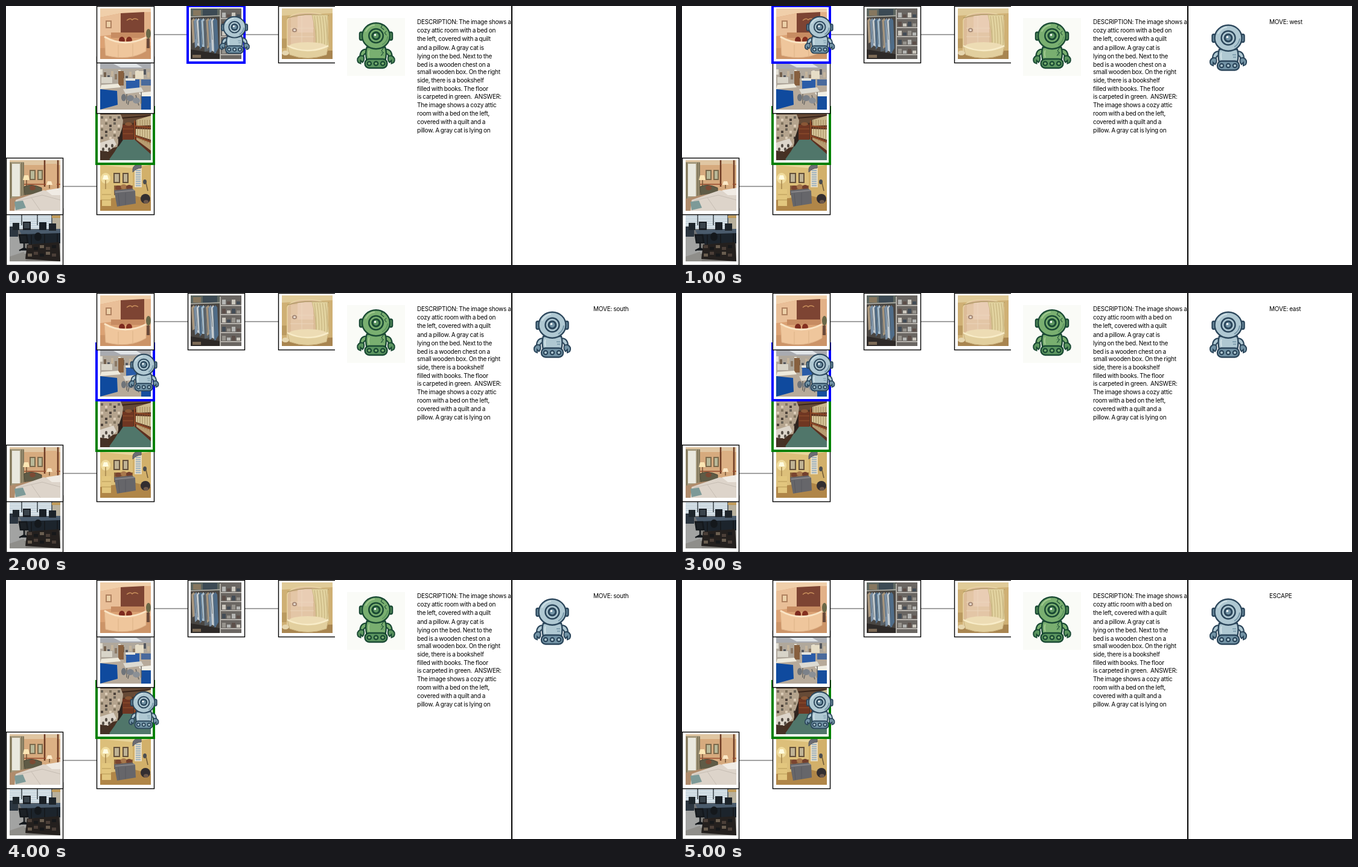
An HTML page that plays this animation: 1110x430 px, repeating every 6000 ms.

```html
<!DOCTYPE html>
<html lang="en">
<head>
<meta charset="utf-8">
<title>Robot room search</title>
<style>
html, body { margin: 0; width: 100%; height: 100%; overflow: hidden; background: #fff; }
svg { display: block; }
text { font: 10px Inter, Arial, sans-serif; letter-spacing: -.2px; word-spacing: -.6px; fill: #000; white-space: pre; }
</style>
</head>
<body>
<svg id="stage" width="1110" height="430" viewBox="0 0 1110 430"></svg>
<script>
const rect = (x, y, w, h, fill, more = "") =>
  `<rect x="${x}" y="${y}" width="${w}" height="${h}" fill="${fill}" ${more}/>`;
const poly = (points, fill) => `<polygon points="${points}" fill="${fill}"/>`;
const oval = (x, y, rx, ry, fill, more = "") =>
  `<ellipse cx="${x}" cy="${y}" rx="${rx}" ry="${ry}" fill="${fill}" ${more}/>`;
const path = (d, stroke, width = 1, fill = "none") =>
  `<path d="${d}" stroke="${stroke}" stroke-width="${width}" fill="${fill}"/>`;
const repeat = (n, draw) => Array.from({ length: n }, (_, i) => draw(i)).join("");
const pick = (list, i) => list[i % list.length];

// Each photo is a simplified 84 x 84 scene.
const photos = {
  lobby: () =>
    rect(0, 0, 84, 84, "#dba274") +
    poly("0,0 84,0 84,7 34,8 0,15", "#f0cfaa") +
    poly("0,15 34,8 34,42 0,46", "#e9bf98") +
    rect(9, 20, 10, 13, "#b08260") + rect(11, 22, 6, 9, "#ecd0a8") +
    poly("34,8 73,6 73,42 34,41", "#7d4433") +
    path("M44 20q6 -5 9 -1q4 -4 10 0", "#c9905c", 1.5) +
    rect(73, 6, 11, 50, "#e2b188") +
    poly("0,66 84,62 84,84 0,84", "#cc9468") +
    rect(18, 40, 56, 9, "#c78c62") +
    oval(36, 53, 5, 6, "#7c2a1e") + oval(48, 53, 5, 6, "#84301f") +
    path("M7 46Q40 66 76 47V71Q48 88 9 78Z", "#dcb086", 1, "#efc69c") +
    path("M7 47Q40 66 76 48", "#fae4c4", 3) +
    path("M30 60V82M54 59V81", "#dcb286") +
    oval(80, 42, 4, 8, "#6a6848") + rect(77, 50, 5, 16, "#6a4a3a"),

  workshop: () =>
    rect(0, 0, 84, 84, "#b0a89c") +
    rect(0, 0, 84, 16, "#a9abb0") + poly("22,8 60,8 70,14 34,14", "#dfe3e6") +
    repeat(14, i => rect(i * 6, 17 + (i * 5) % 12, 4, 9,
      pick(["#e2ded2", "#75624f", "#565a60", "#c4b49c", "#8c7a66"], i))) +
    rect(30, 20, 9, 24, "#87603f") + rect(58, 20, 14, 13, "#e6ddc6") +
    rect(2, 30, 18, 10, "#d8d4c8") +
    poly("0,46 84,42 84,84 0,84", "#b7aa9a") +
    rect(43, 34, 22, 18, "#2a5ca8") + rect(42, 32, 16, 4, "#e4e4de") + rect(68, 34, 16, 10, "#4a6a9c") +
    poly("2,43 30,41 34,47 0,50", "#eeeadc") +
    poly("0,50 28,53 29,76 0,84", "#0f4a9e") +
    poly("38,50 68,47 72,54 42,58", "#dcdad2") +
    rect(68, 61, 16, 23, "#164e9e") + poly("64,56 84,54 84,62 68,62", "#f0eee4") +
    path("M44 58V74M68 55V74M50 60l-4 16M59 60l5 17", "#6a6864", 1.5) +
    oval(50, 65, 6, 5, "#7c828a") + oval(60, 69, 6, 5, "#8b9096") +
    oval(39, 64, 4, 6, "#6f747a"),

  attic: () =>
    rect(0, 0, 84, 84, "#473022") +
    poly("28,6 84,6 84,20 56,22 34,24", "#664a36") +
    path("M36 14L84 10", "#38241a", 2) +
    poly("0,8 34,8 38,18 36,36 28,62 0,68", "#b5a48e") +
    repeat(20, i => rect(1 + (i % 5) * 7, 11 + Math.floor(i / 5) * 10 + (i % 2) * 4, 4, 4,
      pick(["#6c6458", "#dccdb8", "#81745f", "#4f443c"], i))) +
    poly("24,70 36,50 58,49 84,72 84,84 14,84", "#50766a") +
    poly("30,50 38,26 38,50 30,62", "#2f241e") +
    rect(37, 25, 18, 25, "#6f3622") +
    path("M38 32H55M38 40H55", "#96542f") + oval(47, 24, 6, 3, "#8a5736") +
    poly("55,22 84,14 84,74 56,49", "#5d3020") +
    poly("60,17 84,10 84,26 60,27", "#cbb88c") +
    poly("59,32 84,33 84,50 59,42", "#d8c79a") +
    poly("60,46 84,55 84,68 60,50", "#b89c70") +
    repeat(6, i => path(`M${62 + i * 4} 17V${48 + i * 2}`, "#8d7148", .8)) +
    path("M56 27L84 30M56 43L84 54M57 18V50", "#8f4826", 2) +
    poly("0,55 22,48 27,58 13,70 0,68", "#ddd5ca") +
    repeat(4, i => oval(5 + i * 5, 66 - i % 2 * 6, 2, 3, "#544c44")) +
    poly("0,70 11,69 16,84 0,84", "#453226"),

  study: () =>
    rect(0, 0, 84, 84, "#dcbf7a") +
    poly("0,0 84,0 84,8 52,13 0,8", "#e8d59c") +
    poly("54,12 84,8 84,70 54,60", "#d2b06a") +
    rect(22, 21, 11, 17, "#64503a") + rect(24, 23, 7, 13, "#bfb294") +
    rect(37, 21, 10, 17, "#64503a") + rect(39, 23, 6, 13, "#bfb294") +
    poly("0,66 54,58 84,66 84,84 0,84", "#b08648") +
    rect(57, 13, 12, 32, "#e8dcc0") +
    repeat(8, i => rect(59, 16 + i * 3.6, 8, 2, "#9db2c0")) +
    path("M54 15q1 -9 14 -8v6q-8 0 -14 7Z", "#585860", 1, "#6c6c72") +
    oval(74, 36, 3, 4, "#4b4d50") + path("M76 38l3 13", "#705a38", 1.5) +
    oval(9, 30, 8, 9, "#f0dc9e") +
    poly("4,32 6,25 12,25 14,32", "#fffbe0") + path("M9 33V49", "#a4844c", 1.5) +
    rect(3, 48, 15, 28, "#e2c67e") + path("M3 57H18M3 66H18", "#b59655") +
    rect(23, 42, 31, 16, "#8b633a") +
    oval(30, 46, 5, 4, "#7a4530") + oval(39, 44, 5, 4, "#a8784c") + oval(48, 45, 5, 4, "#73402e") +
    poly("23,50 53,47 58,51 59,72 28,77", "#66666a") + path("M25 53L57 50", "#88878a", 2) +
    path("M30 55L32 76M42 54V74", "#59595e") +
    oval(75, 64, 8, 8, "#332e30") + oval(76, 69, 4, 3, "#6c584c"),

  hotel: () =>
    rect(0, 0, 84, 84, "#d6aa7e") +
    rect(0, 0, 84, 8, "#e0c6a2") +
    rect(0, 3, 24, 62, "#a59a7e") + rect(4, 6, 13, 54, "#e9e8de") +
    path("M2 4V65M20 4V62M23 4V60", "#80765a", 2) +
    rect(33, 16, 10, 17, "#7c6a4c") + rect(35, 18, 6, 13, "#b8b898") +
    rect(46, 16, 9, 17, "#7c6a4c") + rect(48, 18, 5, 13, "#b8b898") +
    path("M58 0V44M80 0V50", "#6f3c24", 2.5) + path("M24 40H84", "#964a2c", 1.5) +
    rect(60, 6, 18, 36, "#dcb084") +
    poly("22,33 24,25 31,25 33,33", "#fbe6b4") + path("M28 33V45", "#755536", 1.5) +
    poly("61,41 63,35 69,35 71,41", "#fbe8c6") + path("M66 41V47", "#755536", 1.5) +
    path("M24 44q12 -6 29 2v13H25Z", "#454434", 1, "#5f5b46") + oval(38, 46, 5, 4, "#7c4a34") +
    poly("0,64 25,58 54,54 84,58 84,84 0,84", "#b08c6c") +
    poly("10,66 56,50 84,54 84,84 8,84", "#ddd4ca") +
    poly("60,50 84,46 84,58 70,58", "#f0ebe4") +
    path("M14 67L54 58L84 66M36 62L51 84", "#c6bdb3") +
    poly("8,69 22,67 27,79 10,83", "#7d9a98"),

  office: () =>
    rect(0, 0, 84, 84, "#6f7274") +
    rect(0, 0, 72, 30, "#b4c6d2") +
    repeat(8, i => rect(0, 7 + i * 3, 70, 1.4, "#eef3f5")) +
    path("M20 0V24M46 0V24M70 0V28", "#5c666c", 2) +
    rect(71, 6, 13, 24, "#b8b09c") + rect(70, 8, 14, 4, "#c09a58") +
    rect(0, 40, 84, 44, "#82807c") +
    poly("0,42 16,42 30,70 0,78", "#a2a3a2") +
    poly("16,32 84,30 84,38 20,40", "#4a5b6c") +
    poly("22,39 84,37 84,54 32,56", "#1c242c") +
    rect(0, 26, 14, 17, "#2c3640") +
    rect(22, 18, 13, 14, "#191e24") + rect(49, 19, 12, 13, "#1a2026") + rect(65, 21, 12, 12, "#1d242a") +
    rect(24, 20, 9, 9, "#3a444c") + rect(5, 20, 11, 12, "#1e262c") +
    path("M36 40V56M58 39V55M79 38V56", "#161a1e", 2) +
    path("M16 40h12l2 13H18ZM24 54v10M16 66l8 -4l8 4", "#14181c", 2.5, "#1c2126") +
    oval(47, 43, 6, 7, "#14181c") +
    poly("29,56 82,52 84,84 26,80", "#24201e") +
    repeat(10, i => rect(30 + i % 5 * 10, 57 + Math.floor(i / 5) * 11 + i % 2 * 3, 7, 5,
      pick(["#4b3f38", "#16181a", "#6a5e50"], i))) +
    poly("0,76 24,68 27,84 0,84", "#8f8e8a"),

  closet: () =>
    rect(0, 0, 84, 84, "#4a4642") +
    rect(0, 0, 48, 14, "#5d6660") + rect(4, 3, 13, 9, "#86775f") + rect(20, 1, 24, 11, "#3c4a54") +
    path("M0 14L48 12", "#b5b1a8", 1.5) +
    repeat(10, i => poly(`${1 + i * 4},${20 + i % 3} ${5 + i * 4},16 ${8 + i * 4},20 ${10 + i * 4},${54 + i * 5 % 14 + i} ${3 + i * 4},${58 + i * 7 % 13 + i}`,
      pick(["#a8957c", "#7a90a6", "#c6cccf", "#4f6c88", "#a5bccc", "#59626a"], i))) +
    repeat(9, i => path(`M${5 + i * 4} 21l3 ${30 + i * 7 % 12}`, "#5b666e", .8)) +
    rect(49, 0, 35, 84, "#6a6662") +
    repeat(5, y => rect(50, 16 + y * 15, 34, 1.5, "#cbc8c2") +
      repeat(4, x => rect(52 + x * 8, 7 + y * 15 + x % 2 * 3, 6, 8 - x % 2 * 3,
        pick(["#b4b5b3", "#5d4f4a", "#cbc7be", "#434c56", "#96938d"], x + y)))) +
    path("M49 2V84", "#cdcac2", 1.5) +
    poly("0,68 48,76 48,84 0,84", "#2e2a28") + rect(3, 77, 14, 5, "#7c6a56"),

  bath: () =>
    rect(0, 0, 84, 84, "#cfb074") +
    poly("0,0 84,0 84,8 0,12", "#e0cb98") +
    path("M9 70V20Q14 7 42 7Q72 7 76 20V66Z", "#e8d4a4", 1.5, "#dcbc98") +
    poly("15,16 52,12 52,62 15,62", "#e3c6a6") +
    poly("26,12 52,10 52,40 26,40", "#e9cdb4") +
    path("M14 33H53M14 47H53M33 12V62", "#edd8bf", .8) +
    path("M9 16Q35 7 78 12", "#a8925f", 1.2) +
    path("M50 11h26q-2 26 2 54H56q2 -25 -6 -54", "#cdb984", 1, "#e2d3a0") +
    repeat(5, i => path(`M${54 + i * 4.5} 13q4 28 3 52`, "#c4b07c", 1)) +
    oval(21, 36, 4, 3.5, "#a68977") + oval(21, 36, 2, 1.5, "#f0e6da") +
    poly("0,72 84,70 84,84 0,84", "#a88550") +
    path("M9 62Q42 76 77 62L74 77Q42 88 13 77Z", "#cab17e", 1, "#e2cf9e") +
    oval(43, 63, 31, 7, "#eddcb4") + path("M9 62Q42 78 77 62", "#f8ecc8", 2.5) +
    rect(0, 50, 8, 16, "#bb9a60") + oval(6, 74, 6, 4, "#e6d6ae")
};

// Column and row of each room; later rooms lie on top.
const rooms = {
  office: [0, 4], hotel: [0, 3], study: [1, 3], attic: [1, 2],
  workshop: [1, 1], lobby: [1, 0], closet: [2, 0], bath: [3, 0]
};
const size = 94.6;
const corner = name => [.3 + 150.4 * rooms[name][0], 84 * rooms[name][1]];

function room(name) {
  const [x, y] = corner(name);
  return rect(0, 0, 0, 0, "#fff", `id="${name}"`) +
    `<svg x="${Math.round(x + 5.3)}" y="${y + 4}" width="84" height="84">` +
    `<g filter="url(#soft)">${photos[name]()}</g></svg>`;
}

function robot(dark, mid, light, shine) {
  const edge = `stroke="${dark}" stroke-width="2.4"`;
  const side = s => `<g transform="scale(${s} 1)">` +
    rect(21.5, -22, 5, 13, mid, edge + ' rx="2.5"') +
    path("M15 6Q25 6 26 17L21 20Q20 13 15 13Z", dark, 2.2, light) +
    path("M20 18Q27 15 30 22Q31 29 25 30L25 25L22 28Q18 24 20 18Z", dark, 2, mid) + "</g>";
  return side(-1) + side(1) +
    path("M-15 3H15Q18 13 15 25H-15Q-18 13 -15 3Z", dark, 2.4, light) +
    path("M-11 8Q-13 13 -11 20", shine, 2) +
    path("M7 12H13M8 16H13", mid, 1.4) +
    rect(-18, 22.5, 36, 15, mid, edge + ' rx="7"') +
    repeat(3, i => oval(i * 11 - 11, 30, 3.2, 3.2, light, `stroke="${dark}" stroke-width="2.2"`)) +
    oval(0, -15.8, 22.5, 21.5, light, edge) +
    path("M-17 -23Q-12 -33 -2 -34", shine, 2) +
    path("M10 -1Q18 -6 19 -15", mid, 2) +
    oval(0, -16, 11.5, 11.5, light, edge) +
    oval(0, -16, 7.5, 7.5, dark) + oval(0, -16, 4.4, 4.4, mid) +
    oval(-1.5, -17.5, 1.8, 1.8, "#fff");
}

const blueBot = robot("#2b465b", "#7394a6", "#afc8d2", "#d0e1e6");
const greenBot = robot("#1a4a34", "#5c9660", "#79af70", "#a3ca92");
const cracks = path("M7 -37l3 4l-2 3l5 4M17 -24l-3 3l3 4M12 4l-3 5l3 3l-4 5", "#1a4a34", 1);

const words = `DESCRIPTION: The image shows a
cozy attic room with a bed on
the left, covered with a quilt
and a pillow. A gray cat is
lying on the bed. Next to the
bed is a wooden chest on a
small wooden box. On the right
side, there is a bookshelf
filled with books. The floor
is carpeted in green.  ANSWER:
The image shows a cozy attic
room with a bed on the left,
covered with a quilt and a
pillow. A gray cat is lying on`.split("\n");
const baselines = [30, 44, 58, 73, 87, 101, 113, 127, 141, 154, 168, 182, 196, 210];

document.getElementById("stage").innerHTML =
  `<filter id="soft" x="0" y="0" width="1" height="1"><feGaussianBlur stdDeviation=".6"/></filter>` +
  rect(0, 0, 1110, 430, "#fff") +
  `<svg width="545" height="430">` +
  path("M245 47.5H301M395 47.5H452M94 299.5H151", "#808080", 1.4) +
  Object.keys(rooms).map(room).join("") +
  `<g id="walker">${blueBot}</g></svg>` +
  rect(565, 20, 96, 96, "#fafbf7") +
  `<g transform="translate(613 65.5) scale(1.02 1)">${greenBot}${cracks}</g>` +
  words.map((line, i) => `<text x="681" y="${baselines[i]}">${line}</text>`).join("") +
  rect(837, 0, 2, 430, "#000") +
  `<g id="panel"><g transform="translate(905 69)">${blueBot}</g>` +
  `<text id="move" x="973" y="30"></text></g>`;

const steps = [
  ["closet", ""], ["lobby", "MOVE: west"], ["workshop", "MOVE: south"],
  ["workshop", "MOVE: east"], ["attic", "MOVE: south"], ["attic", "ESCAPE"]
];
const el = id => document.getElementById(id);
const start = performance.now();
let shown = -1;

// Snaps the border to whole pixels: thin lines on centres, thick ones on edges.
function setBorder(name, color) {
  const [x, y] = corner(name);
  const thin = color === "black";
  const snap = v => Math.floor(v) + (thin ? .5 : 0);
  const attrs = {
    x: snap(x), y: snap(y),
    width: snap(x + size) - snap(x), height: snap(y + size) - snap(y),
    stroke: color, "stroke-width": thin ? 1.4 : 4
  };
  for (const key in attrs) el(name).setAttribute(key, attrs[key]);
}

function show(step) {
  const [here, message] = steps[step];
  for (const name in rooms)
    setBorder(name, name === "attic" ? "green" : name === here ? "blue" : "black");
  const [x, y] = corner(here);
  el("walker").setAttribute("transform", `translate(${x + 77.5} ${y + 48}) scale(.81)`);
  el("panel").style.display = message ? "" : "none";
  el("move").textContent = message;
}

function tick(now) {
  const step = Math.floor(Math.max(0, now - start) % 6000 / 1000);
  if (step !== shown) show(shown = step);
  requestAnimationFrame(tick);
}
tick(start);
</script>
</body>
</html>
```
